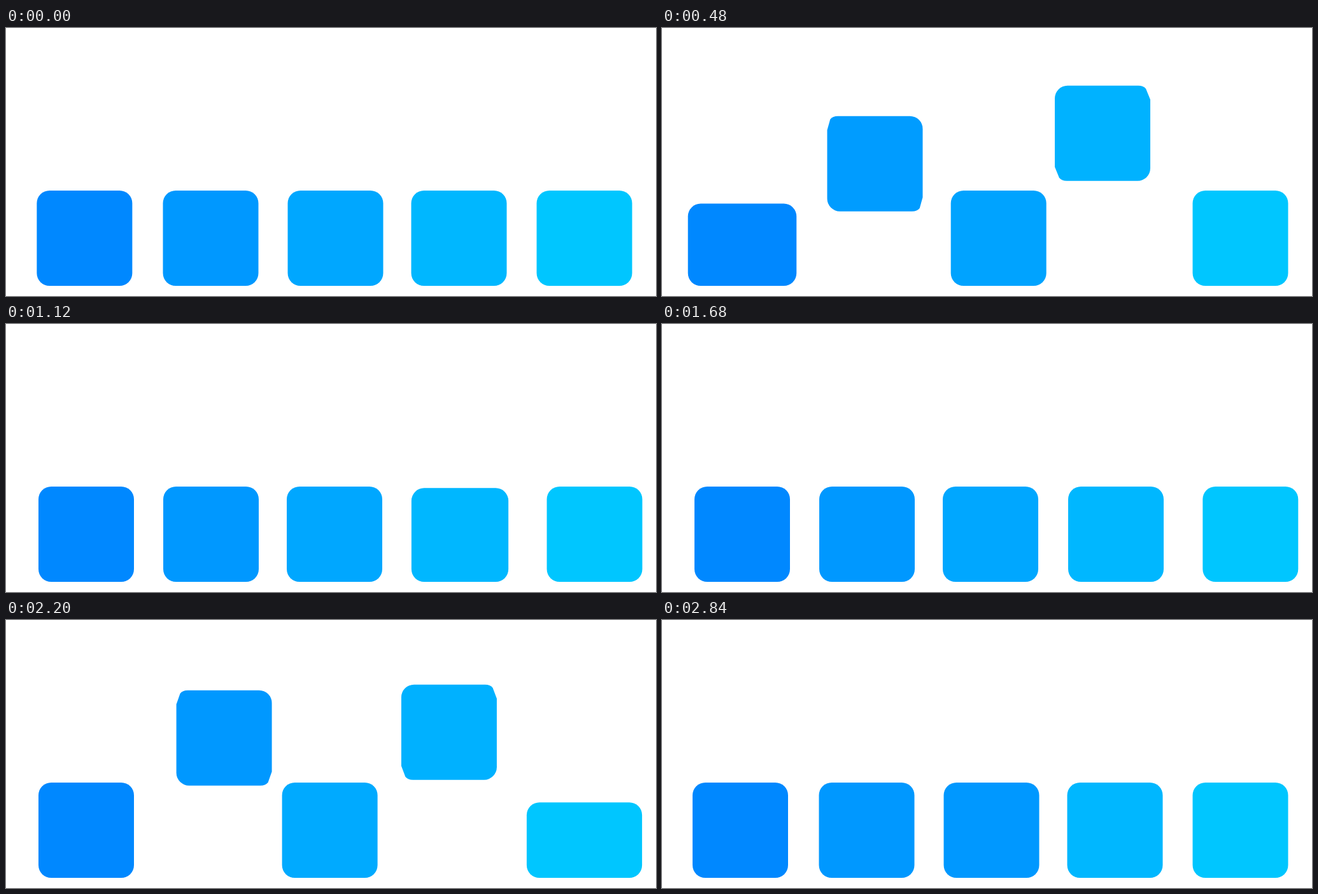
An HTML page with a canvas that plays this animation: 1021 by 422 pixels, repeating every 3560 ms.

```html
<!DOCTYPE html>
<html lang="en">
<head>
<meta charset="utf-8">
<title>Leaping blocks</title>
<style>
  html, body { margin: 0; width: 100%; height: 100%; overflow: hidden; background: #fff; }
  canvas { display: block; }
</style>
</head>
<body>
<canvas id="stage" width="1021" height="422"></canvas>
<script>
const ctx = document.getElementById('stage').getContext('2d');
const LOOP = 3560, STEP = 40;
const SIZE = 150, FLOOR = 406, RADIUS = 20, LEAP = 233, SQUASH = 33;
const GREENS = [136, 152, 167, 183, 198];
const HOME = [48, 246.5, 442.5, 636.5, 833.5];
const AWAY = [51, 247, 441, 638, 849.5];

// One block slides along the floor while the others leap over it.
const RIGHTWARD = {
  slide: { from: HOME[0], to: AWAY[4], start: -12, time: 976 },
  tint: { from: GREENS[0], to: GREENS[4], start: 44, time: 1008 },
  leapTime: 392, leapTintTime: 392, squashTime: 79,
  leaps: [42, 183, 358, 540].map((start, i) => ({
    start, from: HOME[i + 1], to: AWAY[i], tint: [GREENS[i + 1], GREENS[i]]
  }))
};
const LEFTWARD = {
  slide: { from: AWAY[4], to: HOME[0], start: 1671, time: 1032 },
  tint: { from: GREENS[4], to: GREENS[0], start: 1700, time: 1104 },
  leapTime: 380, leapTintTime: 430, squashTime: 57,
  leaps: [3, 2, 1, 0].map((slot, i) => ({
    start: 1771 + 161 * i, from: AWAY[slot], to: HOME[slot + 1],
    // The block in the second slot keeps its colour.
    tint: [GREENS[slot], GREENS[slot === 1 ? 1 : slot + 1]]
  }))
};

const clamp = v => Math.min(1, Math.max(0, v));
const lerp = (a, b, p) => a + (b - a) * p;
const ease = p => p * p * (3 - 2 * p);
const fill = green => { ctx.fillStyle = `rgb(0, ${Math.round(green)}, 255)`; };

function restingBlock(x, y, squash = 0) {
  ctx.beginPath();
  ctx.roundRect(x - squash / 2, y + squash, SIZE + squash, SIZE - squash, RADIUS);
  ctx.fill();
}

// In the air two opposite corners are cut at a slant.
function flyingBlock(x, y, cut, mirrored) {
  const h = SIZE / 2;
  ctx.save();
  ctx.translate(x + h, y + h);
  if (mirrored) ctx.scale(-1, 1);
  ctx.beginPath();
  for (const s of [1, -1]) {
    ctx.lineTo(s * -(h - RADIUS), s * -h);
    ctx.lineTo(s * (h - cut - 12), s * -h);
    ctx.quadraticCurveTo(s * (h - cut - 4), s * -h, s * (h - cut), s * -(h - 5));
    ctx.lineTo(s * h, s * -(h - 22));
    ctx.lineTo(s * h, s * (h - RADIUS));
    ctx.arcTo(s * h, s * h, s * (h - RADIUS), s * h, RADIUS);
  }
  ctx.closePath();
  ctx.fill();
  ctx.restore();
}

function landingSquash(since, riseTime) {
  if (since <= 0) return 0;
  return SQUASH * (since < riseTime ? ease(since / riseTime) : 1 - ease(clamp((since - riseTime) / 130)));
}

// The arc bulges a little beyond its right end.
function leapPoint({ from, to }, s) {
  const fromRight = to < from ? s : 1 - s;
  const bulge = 50 * fromRight * (1 - fromRight) ** 2;
  return [lerp(from, to, ease(s)) + bulge, FLOOR - SIZE - LEAP * 4 * s * (1 - s)];
}

function drawLeap(leap, phase, t) {
  const age = t - leap.start;
  const u = clamp(age / phase.leapTime);
  const [x, y] = leapPoint(leap, ease(u));
  fill(lerp(...leap.tint, clamp(age / phase.leapTintTime)));
  if (u > 0.1 && u < 0.9) {
    const goesLeft = leap.to < leap.from;
    flyingBlock(x, y, 10 * Math.sin(Math.PI * u) ** 2, goesLeft !== u < 0.5);
  } else {
    restingBlock(x, y, landingSquash(age - phase.leapTime, phase.squashTime));
  }
}

function draw(t) {
  const phase = t < 1640 ? RIGHTWARD : LEFTWARD;
  const { slide, tint } = phase;
  const along = c => clamp((t - c.start) / c.time);
  ctx.fillStyle = '#fff';
  ctx.fillRect(0, 0, 1021, 422);
  fill(lerp(tint.from, tint.to, along(tint)));
  restingBlock(lerp(slide.from, slide.to, ease(along(slide))), FLOOR - SIZE);
  for (const leap of phase.leaps) drawLeap(leap, phase, t);
}

const begin = performance.now();
function tick() {
  const t = (performance.now() - begin) % LOOP;
  draw(Math.floor(t / STEP) * STEP);
  requestAnimationFrame(tick);
}
tick();
</script>
</body>
</html>
```
